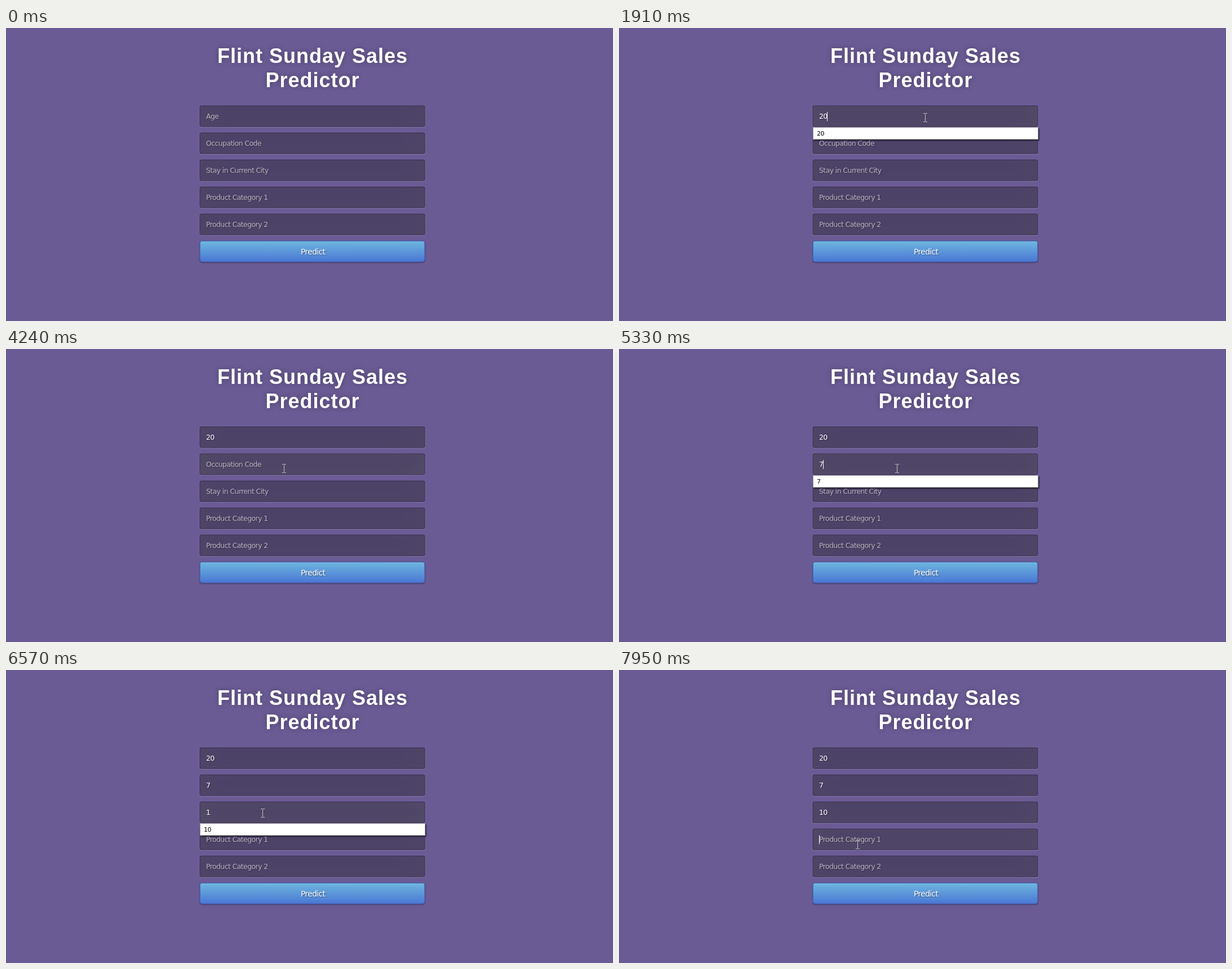
Animation, 1077 px wide and 520 px high, one loop 8000 ms. Source, as an HTML page:

```html
<!DOCTYPE html>
<html lang="en">
<head>
<meta charset="utf-8">
<title>Sales Predictor</title>
<style>
  html, body { margin: 0; width: 100%; height: 100%; overflow: hidden; }
  html { background: #6b5b95; }
  body { position: relative; color: #fff; font: 12.5px/38px "DejaVu Sans", sans-serif; letter-spacing: -.6px; }
  body > * { position: absolute; box-sizing: border-box; }
  h1 {
    left: 344px; top: 28px; width: 400px; margin: 0; text-align: center; white-space: nowrap;
    font: bold 36px/43px "Liberation Sans", Arial, sans-serif; letter-spacing: 1px;
    text-shadow: 0 0 10px rgba(0,0,0,.3);
  }
  .field, #button { left: 344px; width: 400px; height: 38px; z-index: 0; }
  /* The boxes sit on half pixels, their text on whole ones */
  .field::before, #button::before {
    content: ""; position: absolute; inset: 0; z-index: -1; box-sizing: border-box;
    transform: translate(-.5px, -.5px);
  }
  .field { --glow: .2; padding-left: 11px; text-shadow: 1px 1px 1px rgba(0,0,0,.3); }
  .field.empty { color: rgba(255,255,255,.62); }
  .field::before {
    background: rgba(0,0,0,.3); border: 1px solid rgba(0,0,0,.3); border-radius: 4px;
    box-shadow: inset 0 -5px 45px rgba(100,100,100,var(--glow)), 0 1px 1px rgba(255,255,255,.2);
  }
  #button {
    top: 378px; padding-left: 179px; font-size: 14px; letter-spacing: -.7px;
    text-shadow: 1px 1px 1px rgba(0,0,0,.4);
  }
  #button::before {
    background: linear-gradient(#6eb6de, #4a77d4); border: 1px solid #3762bc; border-radius: 5px;
    box-shadow: inset 0 1px 0 rgba(255,255,255,.2), 0 1px 2px rgba(0,0,0,.5);
  }
  #list {
    left: 344px; width: 400px; height: 22px; padding-left: 6px;
    font-size: 11px; line-height: 21px; letter-spacing: -.4px; color: #000;
    background: #fff; border: 1px solid #a0a0a0; box-shadow: 2px 2px 2px rgba(0,0,0,.55);
  }
  #caret { width: 1px; height: 16px; background: #fff; }
  #pointer { left: 0; top: 0; width: 24px; height: 24px; overflow: visible; }
  #ring { left: 0; top: 0; width: 24px; height: 24px; border-radius: 50%; background: rgba(255,255,0,.5); }
</style>
</head>
<body>
<h1>Flint Sunday Sales<br>Predictor</h1>
<div class="field">Age</div>
<div class="field">Occupation Code</div>
<div class="field">Stay in Current City</div>
<div class="field">Product Category 1</div>
<div class="field">Product Category 2</div>
<div id="button">Predict</div>
<div id="list"></div>
<div id="caret"></div>
<svg id="pointer">
  <path id="beam" d="M-3 -7.5H0M1 -7.5H4M.5 -7V7M-3 7.5H0M1 7.5H4" fill="none" stroke="#c6c2c4"/>
  <path id="arrow" d="M.5 .5V17L4.3 13.4L7 19.4L9.6 18.3L7 12.4H12.3Z" fill="#fff" stroke="#000"/>
</svg>
<div id="ring"></div>
<script>
  const LOOP = 8000, GLOW_MS = 500, RING_MS = 225;
  const $ = id => document.getElementById(id);
  const fields = [...document.querySelectorAll('.field')];
  const labels = fields.map(f => f.textContent);
  const rowTop = i => 138 + 48 * i;
  fields.forEach((f, i) => f.style.top = rowTop(i) + 'px');

  // One click per field, in order
  const clicks = [850, 2680, 5860, 7720];
  // time, row, text
  const typed = [[1450, 0, '2'], [1600, 0, '20'], [4780, 1, '7'], [6570, 2, '1'], [6800, 2, '10']];
  // from, to, row, text
  const lists = [[1450, 2680, 0, '20'], [4780, 5860, 1, '7'], [6570, 7720, 2, '10']];
  // on, off, row, x
  const carets = [
    [850, 1380, 0, 355], [1910, 2440, 0, 369],
    [2680, 3220, 1, 355], [3770, 4240, 1, 355], [5330, 5860, 1, 362],
    [5860, 6400, 2, 355], [6630, 6800, 2, 362], [6860, 7340, 2, 369],
    [7720, LOOP, 3, 355]
  ];
  // time, x, y of the pointer's hot spot
  const path = [
    [130, 718, 361], [700, 543, 159], [2160, 543, 159], [2430, 514, 227], [2620, 493, 212],
    [5360, 493, 212], [5710, 455, 254], [7339, 455, 254], [7340, 436, 283], [7570, 423, 310], [LOOP, 423, 310]
  ];

  const during = (rows, t) => rows.find(r => t >= r[0] && t < r[1]);
  const show = (el, on) => el.style.display = on ? '' : 'none';
  const move = (el, x, y) => el.style.transform = `translate(${Math.round(x)}px,${Math.round(y)}px)`;
  const ease = p => { p = Math.min(1, Math.max(0, p)); return 1 - (1 - p) ** 2; };

  function pointerAt(t) {
    const i = path.findIndex(p => p[0] > t);
    const [t0, x0, y0] = path[i - 1], [t1, x1, y1] = path[i];
    const k = ease((t - t0) / (t1 - t0));
    return [x0 + (x1 - x0) * k, y0 + (y1 - y0) * k];
  }

  function draw(t) {
    fields.forEach((f, i) => {
      const on = ease((t - clicks[i]) / GLOW_MS) || 0;
      const off = ease((t - clicks[i + 1]) / GLOW_MS) || 0;
      f.style.setProperty('--glow', .2 + .2 * (on - off));
      const entry = typed.filter(e => e[1] === i && e[0] <= t).pop();
      f.textContent = entry ? entry[2] : labels[i];
      f.classList.toggle('empty', !entry);
    });

    const list = during(lists, t);
    show($('list'), list);
    if (list) {
      $('list').style.top = rowTop(list[2]) + 38 + 'px';
      $('list').textContent = list[3];
    }

    const caret = during(carets, t);
    show($('caret'), caret);
    if (caret) {
      $('caret').style.left = caret[3] + 'px';
      $('caret').style.top = rowTop(caret[2]) + 11 + 'px';
    }

    const visible = t >= path[0][0];
    const pressed = clicks.some(c => t >= c && t < c + RING_MS);
    show($('pointer'), visible);
    show($('ring'), visible && pressed);
    if (!visible) return;
    const [x, y] = pointerAt(t);
    const overList = list && y >= rowTop(list[2]) + 38 && y < rowTop(list[2]) + 60;
    const overField = !overList && fields.some((f, i) => y >= rowTop(i) && y < rowTop(i) + 38);
    show($('beam'), overField);
    show($('arrow'), !overField);
    move($('pointer'), x, y);
    move($('ring'), x - 14, y - 13);
  }

  const start = performance.now();
  function tick() {
    draw((performance.now() - start) % LOOP);
    requestAnimationFrame(tick);
  }
  draw(0);
  requestAnimationFrame(tick);
</script>
</body>
</html>
```
